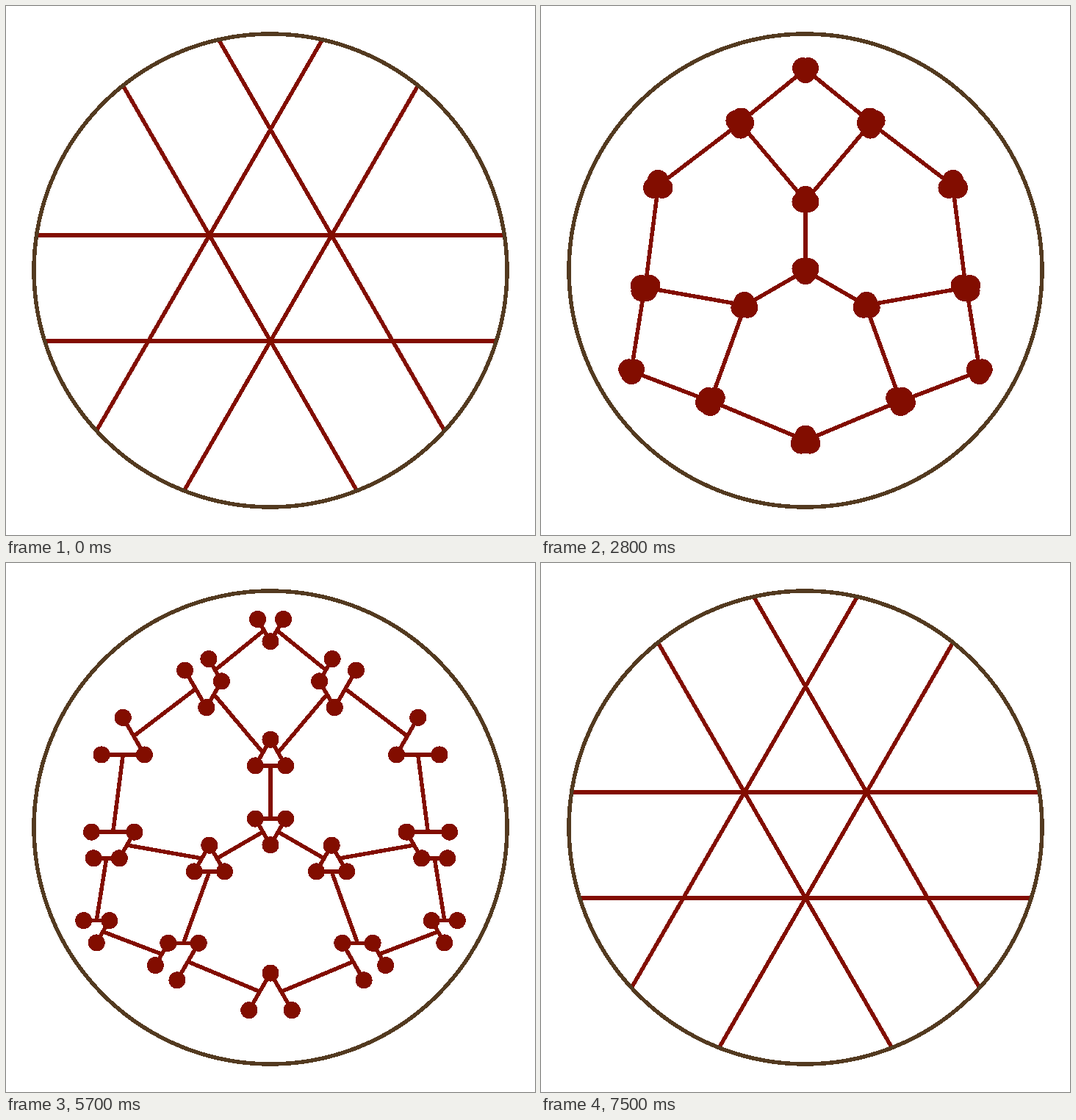
Write an HTML page that moves like this. It is 720 px wide and 720 px high and loops after 8 s.

```html
<!DOCTYPE html>
<html lang="en">
<head>
<meta charset="utf-8">
<title>Line arrangement and its dual graph</title>
<style>
  html, body { margin: 0; width: 100%; height: 100%; overflow: hidden; background: #fff; }
  svg { display: block; width: 100%; height: 100%; }
  path, circle { fill: none; stroke-width: 5.5; shape-rendering: crispEdges; }
  path { stroke: #820d00; stroke-linejoin: round; }
  circle { stroke: #533a20; }
  #dots { stroke-linecap: round; }
</style>
</head>
<body>
<svg viewBox="-360 -360 720 720">
  <path id="lines"/>
  <path id="dots"/>
  <circle r="322"/>
</svg>
<script>
const R = 322, UNIT = 48, LOOP = 8000, STEP = 20;
const lines = document.getElementById('lines');
const dots = document.getElementById('dots');

// Crossings inside the disk (lower case) and line ends on the rim (upper case).
const h = UNIT * Math.sqrt(3);
const points = {
  a: [0, -4 * UNIT], b: [-h, -UNIT], c: [h, -UNIT],
  d: [0, 2 * UNIT], e: [-2 * h, 2 * UNIT], f: [2 * h, 2 * UNIT]
};
const p = Math.asin(UNIT / R), q = Math.asin(2 * UNIT / R), turn = Math.PI / 3;
const rim = {
  A: 4 * turn + q, B: 5 * turn - q, C: 5 * turn + p, D: -p,
  E: q, F: turn - q, G: turn + p, H: 2 * turn - p,
  I: 2 * turn + q, J: 3 * turn - q, K: 3 * turn + p, L: 4 * turn - p
};
for (const k in rim) points[k] = [R * Math.cos(rim[k]), R * Math.sin(rim[k])];

// Each cell is the chain of its straight sides.
const cells = ('AaB BacC CcD DcfE EfF FfdG GdH HdeI IeJ JebK KbL LbaA ' +
  'acba bcdb bdeb cfdc').split(' ').map(chain => {
  const corners = [...new Set(chain)];
  const mean = i => corners.reduce((sum, k) => sum + points[k][i], 0) / corners.length;
  return { chain, corners, center: [mean(0), mean(1)] };
});

const lerp = (a, b, s) => [a[0] + (b[0] - a[0]) * s, a[1] + (b[1] - a[1]) * s];
const clamp = x => Math.min(1, Math.max(0, x));
const ease = u => u < 0.5 ? 4 * u ** 3 : 1 - 4 * (1 - u) ** 3;
const fmt = pt => pt[0].toFixed(2) + ' ' + pt[1].toFixed(2);

function shrinkAt(t) {
  return t < 4000 ? ease(clamp((t - 500) / 3000)) : 1 - ease(clamp((t - 4520) / 2980));
}

function draw(s) {
  const mids = {};
  let strokes = '', spots = '';
  for (const { chain, corners, center } of cells) {
    const at = k => lerp(points[k], center, s);
    strokes += 'M' + [...chain].map(k => fmt(at(k))).join('L');
    for (const k of corners) spots += 'M' + fmt(at(k)) + 'h0';
    for (let i = 1; i < chain.length; i++) {
      const side = [chain[i - 1], chain[i]].sort().join('');
      const mid = fmt(lerp(at(side[0]), at(side[1]), 0.5));
      if (mids[side]) strokes += 'M' + mids[side] + 'L' + mid;
      else mids[side] = mid;
    }
  }
  lines.setAttribute('d', strokes);
  dots.setAttribute('d', spots);
  dots.style.strokeWidth = 2 * (1 + 14 * s);
}

function tick() {
  const t = performance.now() % LOOP;
  draw(shrinkAt(Math.floor(t / STEP) * STEP));
  requestAnimationFrame(tick);
}
tick();
</script>
</body>
</html>
```
